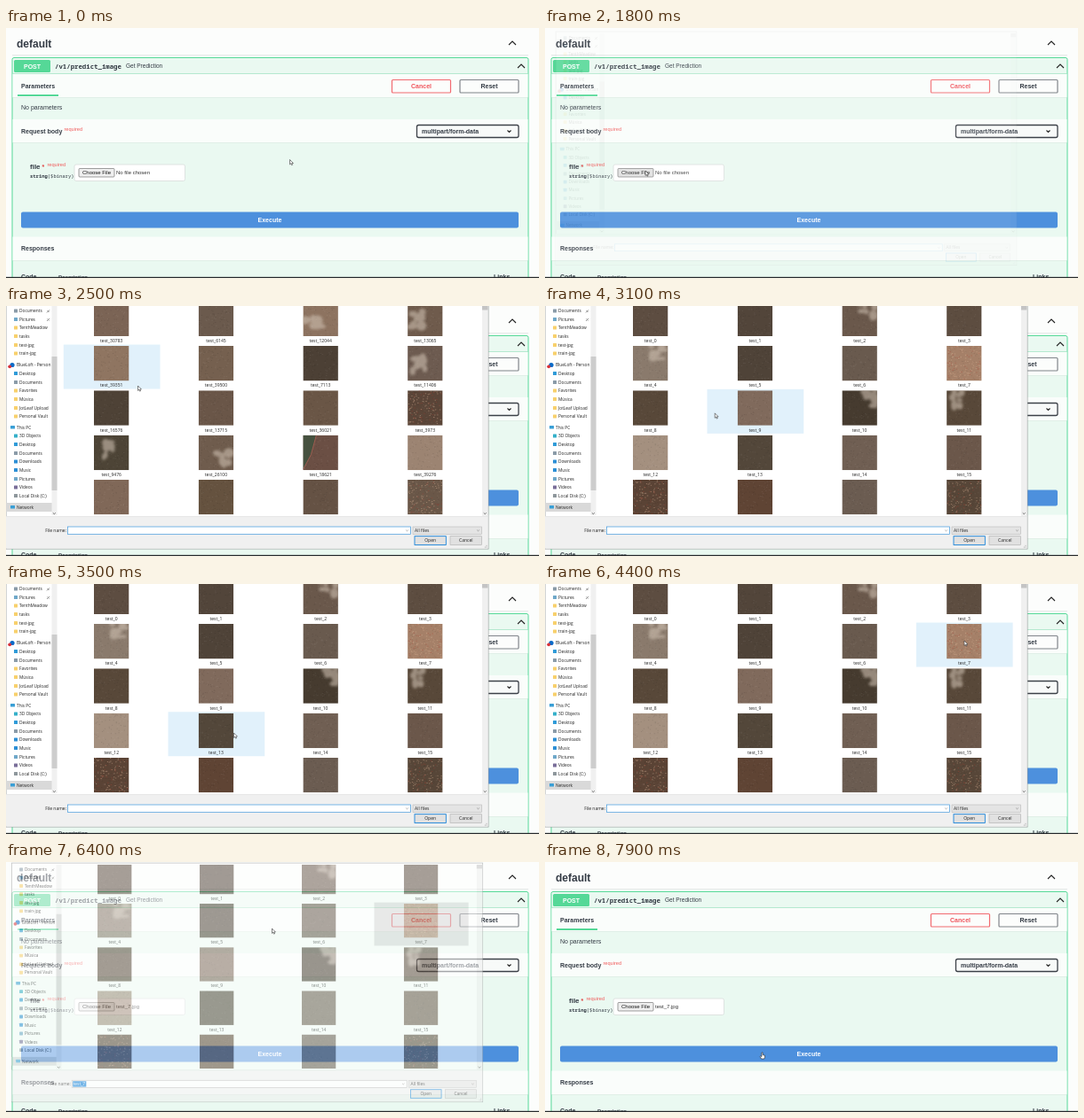
Write an HTML page that moves like this. It is 600x282 px and loops after 8 s.

```html
<!DOCTYPE html>
<html lang="en">
<head>
<meta charset="utf-8">
<title>Upload a file to the API</title>
<style>
html, body { margin: 0; width: 100%; height: 100%; overflow: hidden; background: #fcfdfc; }
svg { display: block; width: 600px; height: 282px; }
text { font-family: "Liberation Sans", Arial, sans-serif; white-space: pre; }
.b { font-weight: bold; }
.m { font-family: "Noto Sans Mono", "DejaVu Sans Mono", monospace; }
.u { font-family: "Open Sans", "Noto Sans", sans-serif; }
.c { text-anchor: middle; }
</style>
</head>
<body>
<svg id="stage" viewBox="0 0 600 282"></svg>
<script>
const INK = '#333a44', GREEN = '#55d897';
const rect = (x, y, w, h, fill, more = '') =>
  `<rect x="${x}" y="${y}" width="${w}" height="${h}" fill="${fill}" ${more}/>`;
const text = (x, y, s, size, cls = '', fill = INK, more = '') =>
  `<text x="${x}" y="${y}" font-size="${size}" class="${cls}" fill="${fill}" ${more}>${s}</text>`;
const line = (d, color, w = 1) =>
  `<path d="${d}" fill="none" stroke="${color}" stroke-width="${w}"/>`;
const chevron = (x, y, w, h, color = '#222', sw = 1.1) =>
  line(`M${x - w} ${y - h}L${x} ${y + h}L${x + w} ${y - h}`, color, sw);
const dot = (x, y, r, fill) => `<circle cx="${x}" cy="${y}" r="${r}" fill="${fill}"/>`;
const stroke = (color, w = 1, rx = 0) => `stroke="${color}" stroke-width="${w}" rx="${rx}"`;

function page() {
  return rect(0, 0, 600, 282, '#fcfdfc') +
    text(12, 22, 'default', 12, 'b') + chevron(570, 17, 4, -2) +
    rect(7, 30.5, 581, .7, '#d8dadb') +
    rect(7, 33.5, 581, 260, '#eaf9f1', stroke(GREEN, 1, 2)) +
    rect(9, 36, 41, 14, GREEN, 'rx="1.5"') + text(29.5, 45.6, 'POST', 7, 'b c', '#fff') +
    text(55, 45.8, '/v1/predict_image', 7.35, 'm b') + text(135, 45.4, 'Get Prediction', 6.5) +
    chevron(580, 43, 4, -2) +
    rect(7.5, 51.3, 580, .7, '#9fe3c2') +
    [[52, 26], [103, 26], [235.5, 26.5]].map(([y, h]) =>
      rect(7.5, y, 580, h, '#fafdfb') + rect(7.5, y + h, 580, .5, '#d5e5dc')).join('') +
    text(17, 68, 'Parameters', 7, 'b') + rect(13, 75, 46, 2, GREEN) +
    rect(434.5, 58.5, 66, 14.5, '#fcfdfc', stroke('#f26a70', 1.2, 1)) + text(467.5, 68, 'Cancel', 7, 'b c', '#f0545c') +
    rect(511, 58.5, 66, 14.5, '#fcfdfc', stroke('#80848a', 1.2, 1)) + text(544, 68, 'Reset', 7, 'b c') +
    text(17, 92.2, 'No parameters', 7) +
    text(17, 118.5, 'Request body', 7, 'b') + text(65.5, 116, 'required', 5.6, '', '#f05a5a') +
    rect(462.5, 109.5, 114.5, 14, '#f8faf9', stroke('#3c4148', 1.3, 2)) +
    text(468, 118.7, 'multipart/form-data', 7, 'b') + chevron(566.5, 116.5, 2, 1) +
    text(27, 158.5, 'file', 8, 'b') + text(40.5, 158.5, '*', 7, 'b', '#e04040') +
    text(46.5, 156, 'required', 5.6, '', '#f05a5a') +
    text(27, 168.5, 'string<tspan font-weight="400">($binary)</tspan>', 5.5, 'm b') +
    rect(77, 154, 124.5, 18.5, '#fff', stroke('#d9dcdb', .8, 2)) +
    rect(82, 158.5, 40, 9.5, '#efefef', stroke('#777', .7, 1) + ' id="choose"') +
    text(86, 165.4, 'Choose File', 6, '', '#111') +
    text(124, 165.4, '', 6, '', '#333', 'id="chosen"') +
    rect(17, 207.5, 560, 18, '#4d90dd', 'rx="2"') + text(297, 219.2, 'Execute', 7, 'b c', '#fff') +
    text(17, 250.8, 'Responses', 7, 'b') +
    text(17, 283.2, 'Code', 7, 'b') + text(59, 282.8, 'Description', 6, 'b') + text(549, 283.2, 'Links', 7, 'b');
}

// Sidebar rows: label, centre y, icon colour; roots sit further left
const places = [
  ['Documents', 5.5, '#8a9ba8'], ['Pictures', 15, '#6fa8c9'], ['TenthMeadow', 24.5, '#f8d06c'],
  ['tasks', 34, '#f8d06c'], ['test-jpg', 44, '#f8d06c'], ['train-jpg', 53.5, '#f8d06c'],
  ['BlueLoft - Person', 66.5, '#0a6ac8', 1], ['Desktop', 76, '#2f9bd8'], ['Documents', 86, '#8a9ba8'],
  ['Favorites', 95.5, '#f8d06c'], ['Música', 105, '#f8d06c'], ['JotLeaf Upload', 115, '#f8d06c'],
  ['Personal Vault', 124.5, '#f8d06c'], ['This PC', 137, '#3a9fd6', 1], ['3D Objects', 146.5, '#35b0c9'],
  ['Desktop', 156, '#2f9bd8'], ['Documents', 166, '#8a9ba8'], ['Downloads', 175.5, '#2c8fd6'],
  ['Music', 185, '#2c8fd6'], ['Pictures', 195, '#6fa8c9'], ['Videos', 204.5, '#7a6f9a'],
  ['Local Disk (C:)', 214, '#8e979c'], ['Network', 227, '#3a9fd6', 1]];

function sidebar() {
  const rows = places.map(([s, y, color, root], i) => {
    const icon = i === 6 ? dot(7, y, 2.6, color) + dot(4.2, y + 1.8, 1.9, '#d8323a')
      : rect(root ? 5 : 9, y - 2, root ? 5 : 4, root ? 3.6 : 4, color, 'rx=".5"');
    return icon + text(root ? 12 : 15, y + 1.8, s, 4.8, 'u', '#222');
  }).join('');
  const pins = [5.5, 15].map(y => line(`M46 ${y + 2}l1.5 -1.5m-1 -1l2 2m-1 -1l1.4 -1.6`, '#777', .8)).join('');
  return rect(0, 222, 52, 10, '#d9d9d9') + `<g clip-path="url(#side)">${rows}${pins}</g>` +
    rect(51.5, 0, 6, 236, '#f0f0f0') + rect(51.5, 57, 6, 151, '#cdcdcd') + chevron(54.3, 234, 1.5, .7, '#555', .8);
}

// Thumbnails: number, base tone, kind (p plain, c clouds, s specks, d divided)
const unsorted = `30783 7b6455 p,6145 6b5a4d p,12044 8d7360 c,13065 6f5b4c c,39351 8f7561 p,39500 75604f p,
7113 4c4035 p,11406 6d5b50 c,16576 4e4236 p,13715 6a5648 p,36021 6a5646 p,3973 5a4538 s,9476 4d4436 c,
26100 6f5c4d c,18621 6b4f44 d,39276 9c8472 p,20417 806858 p,8852 65523f p,31960 655244 p,27308 6a5748 s`;
const sorted = `0 5d4d41 p,1 52453a p,2 6a584b c,3 5d4d40 p,4 8a7a6c c,5 4f4338 p,6 695a4e p,7 a58068 s,
8 584839 p,9 806a5c p,10 463b2f c,11 584839 c,12 a4907f p,13 53473a p,14 705f53 p,15 6b574a p,
16 5a4335 s,17 5f4434 p,18 6b5c51 p,19 574638 s`;
const colX = i => 99 + 117.7 * (i % 4), rowY = i => -5.4 + 50.35 * Math.floor(i / 4);
const SIZE = 39.5;

function random(seed) {
  return () => (seed = (seed * 16807) % 2147483647) / 2147483647;
}

function thumb(x, y, tone, kind, seed) {
  const rnd = random(seed * 7919 + 13);
  for (let i = 0; i < 5; i++) rnd();
  const grain = (n, color, alpha) => {
    let d = '';
    for (let i = 0; i < n; i++) d += `M${(rnd() * 38).toFixed(1)} ${(rnd() * 38).toFixed(1)}h1.3v1h-1.3z`;
    return `<path d="${d}" fill="${color}" opacity="${alpha}"/>`;
  };
  let art = rect(0, 0, SIZE, SIZE, '#' + tone) + grain(70, '#000', .09) + grain(50, '#fff', .06);
  if (kind === 's') art += grain(80, '#d8b095', .42) + grain(40, '#a83c30', .35);
  if (kind === 'd') art += `<path d="M0 0H15L9 22L0 39Z" fill="#46513f"/>` + line('M15 0L9 22L0 39', '#b06055', .8);
  if (kind === 'c') {
    const cx = 8 + rnd() * 24, cy = 8 + rnd() * 24;
    let blobs = '';
    for (let i = 0; i < 8; i++)
      blobs += `<ellipse cx="${cx + rnd() * 18 - 9}" cy="${cy + rnd() * 18 - 9}" rx="${2 + rnd() * 5}" ry="${2 + rnd() * 4}"/>`;
    art += `<g fill="#cdbfb0" opacity=".6" filter="url(#soft)">${blobs}</g>`;
  }
  return `<g transform="translate(${x} ${y})" clip-path="url(#tile)">${art}</g>`;
}

const grid = (list, id) => `<g id="${id}">` + list.split(',').map((item, i) => {
  const [n, tone, kind] = item.trim().split(' '), x = colX(i), y = rowY(i);
  return thumb(x, y, tone, kind, +n + 3) + text(x + SIZE / 2, y + 46.3, 'test_' + n, 5, 'u c', '#222');
}).join('') + '</g>';

function dialog() {
  const cell = id => rect(0, 0, 108.7, 50, '#e1f1fb', `id="${id}"`);
  return rect(0, -2, 543, 276, '#fff', stroke('#8f9494', .8)) + sidebar() +
    `<g clip-path="url(#list)">${cell('hover')}${cell('picked')}${grid(unsorted, 'first')}${grid(sorted, 'second')}</g>` +
    rect(536, 0, 6.5, 237, '#f0f0f0') + rect(536, 0, 6.5, 4.5, '#c4c4c4') + chevron(539.2, 234, 1.5, .7, '#555', .8) +
    rect(0, 237, 542.6, 36.6, '#f0f0f0') + rect(0, 237, 542.6, .5, '#dcdcdc') +
    text(68, 255, 'File name:', 5, 'u', '#222', 'text-anchor="end"') +
    rect(69.5, 249, 386, 8.3, '#fff', stroke('#0078d7', .7) + ' id="field"') +
    rect(70.5, 250, 15.5, 6.5, '#0078d7', 'id="mark"') +
    text(71, 255, '', 5, 'u', '#222', 'id="typed"') + chevron(451.5, 253.2, 1.3, .6, '#777', .6) +
    rect(458, 249, 77.5, 8.3, '#e4e4e4', stroke('#b8b8b8', .6)) + text(460, 255, 'All files', 5, 'u', '#222') +
    chevron(531.5, 253.2, 1.3, .6, '#777', .6) +
    rect(460, 259.7, 35.3, 9.8, '#e1e1e1', stroke('#0078d7', .8) + ' id="open"') + text(477.6, 266.4, 'Open', 5, 'u c', '#222') +
    rect(500, 259.7, 35.5, 9.8, '#e1e1e1', stroke('#adadad', .6)) + text(517.8, 266.4, 'Cancel', 5, 'u c', '#222') +
    dot(541, 272, .5, '#999') + dot(539.3, 272, .5, '#999') + dot(541, 270.3, .5, '#999');
}

const clip = (id, x, y, w, h) => `<clipPath id="${id}">${rect(x, y, w, h, '#000')}</clipPath>`;
const stage = document.getElementById('stage');
stage.innerHTML = `<defs>${clip('side', 0, 0, 51.5, 236)}${clip('list', 58, 0, 478, 235.3)}${clip('tile', 0, 0, SIZE, SIZE)}
  <filter id="soft"><feGaussianBlur stdDeviation="1.5"/></filter></defs>
  ${page()}<g id="dialog">${dialog()}</g>${rect(0, 280.8, 600, 1.2, '#26292b')}
  <path id="arrow" d="M0 0V5.4L1.3 4.3L2.1 6.2L3 5.8L2.2 4H3.9Z" fill="#fff" stroke="#333" stroke-width=".6"/>
  <path id="hand" d="M-.6 0Q0 -.6 .6 0V2.6L3 3.2V5.2L2.3 7H-1L-2.4 4.4L-1.8 3.8L-.6 4.6Z" fill="#fff" stroke="#222" stroke-width=".6"/>`;
const el = {};
stage.querySelectorAll('[id]').forEach(e => el[e.id] = e);

const set = (e, attrs) => { for (const k in attrs) e.setAttribute(k, attrs[k]); };
const show = (e, on) => set(e, { visibility: on ? 'visible' : 'hidden' });
const clamp = v => Math.max(0, Math.min(1, v));

// Pointer stops: time, x, y
const stops = [[0, 319.5, 148.5], [300, 319.5, 148.5], [1400, 113, 161], [1950, 113, 161], [2500, 148.5, 90],
  [2800, 148.5, 90], [3500, 256.5, 168], [4300, 472, 64], [4700, 472, 64], [5500, 473, 262], [6150, 473, 262],
  [6400, 299.5, 75], [7400, 244.5, 215], [8000, 244.5, 215]];
const SORT = 2800, PICK = 4500, CONFIRM = 6250;

function pointer(t) {
  const i = stops.findIndex(s => s[0] > t), [t0, x0, y0] = stops[i - 1], [t1, x1, y1] = stops[i];
  const p = (t - t0) / (t1 - t0), e = p * p * (3 - 2 * p);
  return [x0 + (x1 - x0) * e, y0 + (y1 - y0) * e];
}

function placeCell(e, i, on) {
  set(e, { x: colX(i) - 34.2, y: rowY(i) - 1.4 });
  show(e, on);
}

function draw(t) {
  const [x, y] = pointer(t);
  const inside = (x0, y0, x1, y1) => x > x0 && x < x1 && y > y0 && y < y1;
  const opened = clamp((t - 1780) / 200) * (1 - clamp((t - 6310) / 195));
  const scale = .95 + .05 * opened, listed = t >= 2000, picked = t >= PICK;

  show(el.dialog, opened > 0);
  set(el.dialog, { opacity: opened, transform: `translate(271 132) scale(${scale}) translate(-271 -132)` });
  el.first.style.display = listed && t < SORT ? '' : 'none';
  el.second.style.display = t >= SORT ? '' : 'none';

  const col = Math.floor((x - 64.8) / 117.7), row = Math.floor((y + 6.8) / 50.35), over = row * 4 + col;
  const onCell = inside(64.8, 0, 527, 235) && x - 64.8 - col * 117.7 < 108.7;
  placeCell(el.hover, over, opened === 1 && listed && onCell);
  placeCell(el.picked, 7, opened > 0 && picked);
  set(el.picked, { fill: t < CONFIRM ? '#cce8fc' : '#d9d9d9' });

  const marked = opened > 0 && t >= CONFIRM;
  el.typed.textContent = picked ? 'test_7' : '';
  set(el.typed, { fill: marked ? '#fff' : '#222' });
  show(el.mark, marked);
  set(el.field, { stroke: picked ? '#b0b0b0' : '#3f97dc' });
  set(el.open, { fill: inside(460, 259, 496, 270) ? '#e5f1fb' : '#e1e1e1' });

  el.chosen.textContent = t < CONFIRM ? 'No file chosen' : 'test_7.jpg';
  set(el.choose, { fill: inside(82, 158, 122, 168) ? '#e0e0e0' : '#efefef' });

  const onExecute = opened === 0 && inside(17, 207, 577, 226);
  show(el.hand, onExecute);
  show(el.arrow, !onExecute);
  set(onExecute ? el.hand : el.arrow, { transform: `translate(${x} ${y})` });
}

const start = performance.now();
function tick() {
  draw((performance.now() - start) % 8000);
  requestAnimationFrame(tick);
}
tick();
</script>
</body>
</html>
```
